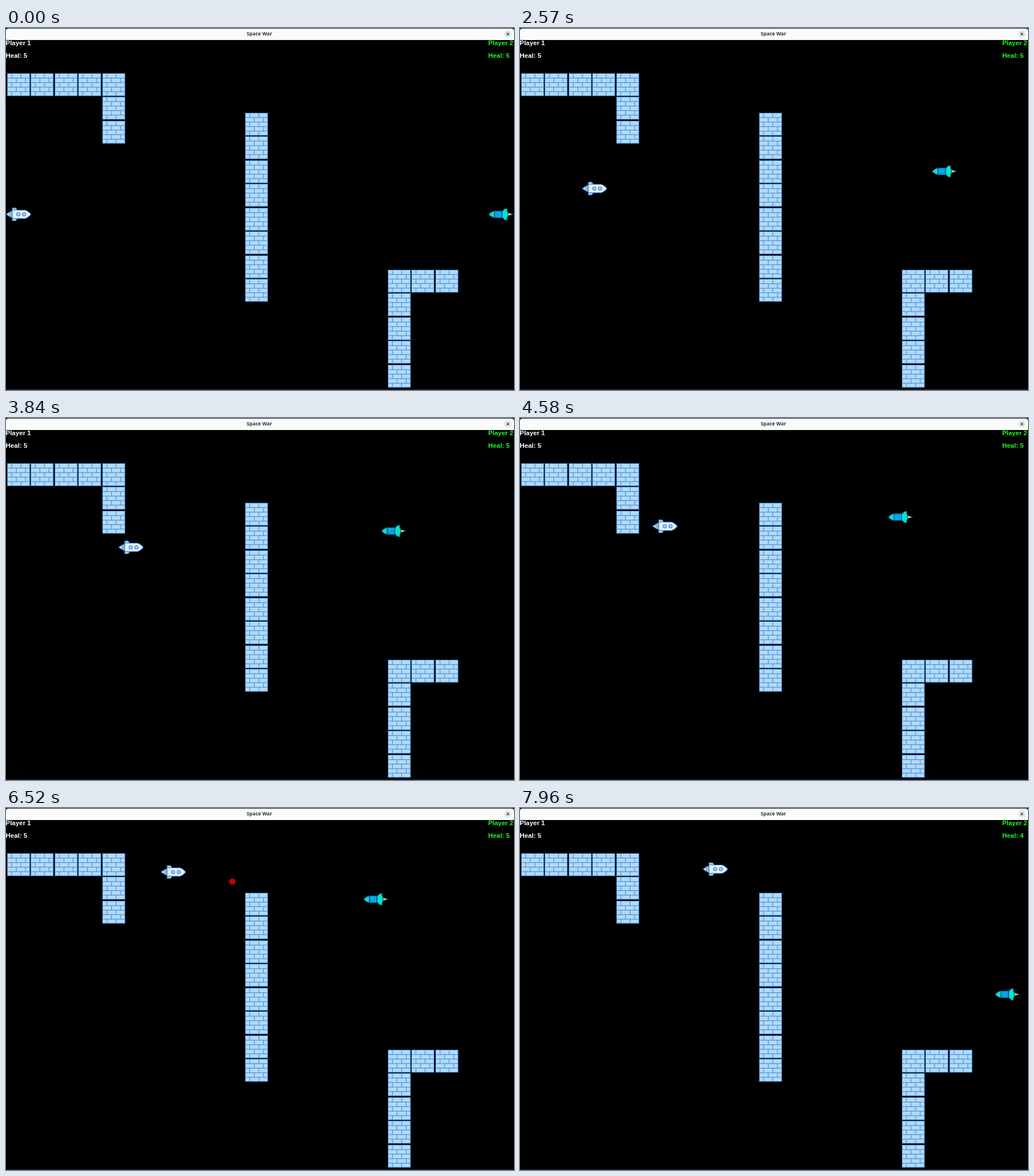
An HTML page that plays this animation: 886 px wide and 632 px high, repeating every 7.99 s.

```html
<!DOCTYPE html>
<html lang="en">
<head>
<meta charset="utf-8">
<title>Space War</title>
<style>
  html, body { margin: 0; width: 100%; height: 100%; overflow: hidden; background: #000; }
  svg { display: block; width: 886px; height: 632px; }
  .hud { font: bold 11.4px "Liberation Sans", Arial, sans-serif; }
  .title { font: 600 8.6px "Noto Sans", sans-serif; fill: #2e3436; }
</style>
</head>
<body>
<svg viewBox="0 0 886 632">
  <defs>
    <g id="brick" stroke="#3f82c6">
      <rect x=".5" y=".5" width="38.8" height="38.8" fill="#b0dafa"/>
      <path id="joints" fill="none"/>
    </g>
  </defs>
  <rect width="886" height="632"/>
  <rect y="630" width="886" height="2" fill="#101a23"/>
  <rect width="886" height="6" fill="#161d24"/>
  <path d="M0 21V5Q0 1 5 1H881Q886 1 886 5V21Z" fill="#fafcfc"/>
  <text class="title" x="442" y="13.4" text-anchor="middle">Space War</text>
  <circle cx="875.3" cy="10.5" r="6.5" fill="#e6e8e8"/>
  <path d="M873.2 8.4l4.2 4.2m0-4.2l-4.2 4.2" stroke="#2e3436" stroke-width="1.2"/>
  <g class="hud" fill="#fff">
    <text x="-.4" y="30">Player 1</text>
    <text x="-.4" y="52">Heal: 5</text>
  </g>
  <g class="hud" fill="#22f722">
    <text x="841" y="30">Player 2</text>
    <text id="heal" x="841" y="52">Heal: 5</text>
  </g>
  <g id="walls"></g>

  <g id="white" stroke="#3f7fc4" stroke-width="1.1" stroke-linejoin="round">
    <path d="M11 -7V-11.2H17L20 -7ZM11 7V11.2H17L20 7Z" fill="#a9d1f5"/>
    <path d="M.4 0L6.5 -4L11 -6V6L6.5 4Z" fill="#cde4fa"/>
    <path d="M6.5 -4V4M9 -5V5" fill="none"/>
    <path d="M11 -7.3H33.5Q39 -5.5 43.4 0Q39 5.5 33.5 7.3H11Z" fill="#e3f0fd"/>
    <circle cx="21.5" r="3" fill="#a9d1f5"/>
    <circle cx="31.5" r="3" fill="#a9d1f5"/>
  </g>

  <g id="cyan" stroke="#0b4a78" stroke-width="1.2" stroke-linejoin="round">
    <path d="M33 -3L42.5 0L33 3Z" fill="#1c2f4a"/>
    <path d="M33.5 -2.2L40.5 0L33.5 2.2Z" fill="#f5dc50" stroke="none"/>
    <path d="M23 -5L27.5 -9.5L32 -10.3V-5.5L33.5 -4V4L32 5.5V10.3L27.5 9.5L23 5Z" fill="#06e2c8"/>
    <path d="M10 -6Q4 -5 0 0Q4 5 10 6Z" fill="#06e2c8"/>
    <rect x="10" y="-6" width="13" height="12" fill="#05a5e4"/>
  </g>

  <circle id="shot" cy="128.4" r="5.5" fill="#c80000"/>
</svg>
<script>
const $ = id => document.getElementById(id);
const LOOP = 7990, FIRE = 6170, HIT = 7300;
const SPEED = 0.0692, SHOT_SPEED = 0.3;   // px per ms
const HOME = 325.3;

// Five courses; vertical joints shift on every other one
const COURSE = 7.9;
let joints = '';
for (let row = 0; row < 5; row++) {
  const y = row * COURSE + 0.5, x = row % 2 ? 16 : 8;
  if (row) joints += `M0 ${y}H39.5`;
  joints += `M${x} ${y}v${COURSE}m16 0v-${COURSE}`;
}
$('joints').setAttribute('d', joints);

// Walls run from a corner along one axis, snapped to whole pixels
const PITCH = 41.5;
function wall(x, y, count, dx, dy) {
  for (let i = 0; i < count; i++) {
    const left = Math.floor(x + i * dx * PITCH), top = Math.floor(y + i * dy * PITCH);
    $('walls').innerHTML += `<use href="#brick" x="${left}" y="${top}"/>`;
  }
}
wall(2, 79, 4, 1, 0);
wall(168, 79, 3, 0, 1);
wall(417, 148, 8, 0, 1);
wall(666, 422, 5, 0, 1);
wall(707.5, 422, 2, 1, 0);

// A key press is [time, distance]: the ship runs that far at SPEED, then rests
const travel = (from, t, ...presses) => presses.reduce((pos, [start, dist]) =>
  pos + Math.sign(dist) * Math.min(Math.abs(dist), SPEED * Math.max(0, t - start)), from);

const whiteX = t => travel(0, t, [1008, 231], [4720, 14], [6160, 25], [7255, 51]);
const whiteY = t => travel(HOME, t,
  [465, 9], [765, -46], [1900, -8], [2730, -54.5], [4050, -98], [6290, -21]);
const cyanX = t => t < HIT
  ? travel(842, t, [718, -123], [2640, -64], [4400, -31])
  : travel(842, t, [7770, -20]);
const cyanY = t => t < HIT
  ? travel(HOME, t, [750, -90], [2330, 15], [3000, -53], [4230, -38])
  : HOME;

function place(id, x, y) {
  $(id).setAttribute('transform', `translate(${x.toFixed(2)} ${y.toFixed(2)})`);
}

function draw(t) {
  place('white', whiteX(t), whiteY(t));
  place('cyan', cyanX(t), cyanY(t));
  $('heal').textContent = 'Heal: ' + (t < HIT ? 5 : 4);
  $('shot').setAttribute('visibility', t >= FIRE && t < HIT ? 'visible' : 'hidden');
  $('shot').setAttribute('cx', 289.5 + (t - FIRE) * SHOT_SPEED);
}

const start = performance.now();
function tick() {
  draw((performance.now() - start) % LOOP);
  requestAnimationFrame(tick);
}
tick();
</script>
</body>
</html>
```
